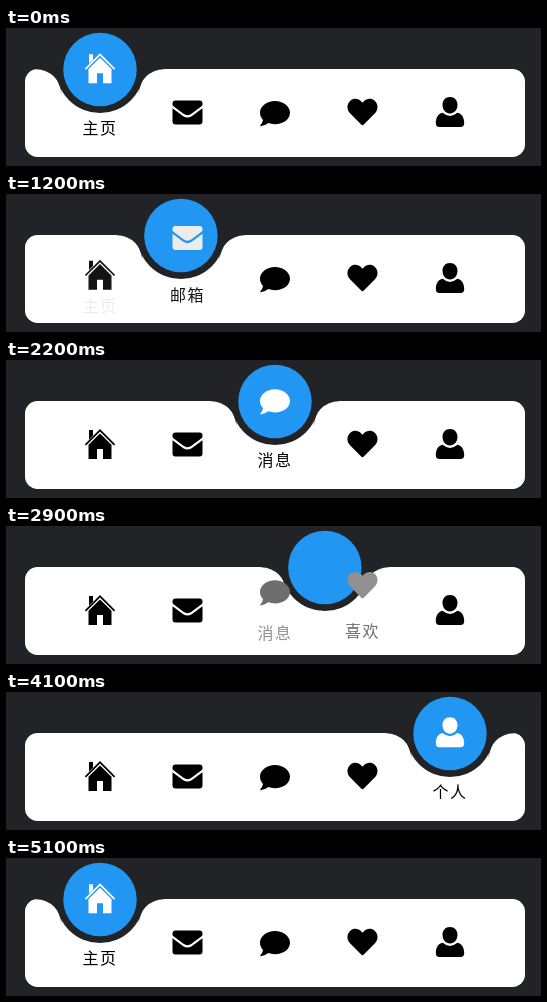
An HTML page with a canvas for the animation above (5.7 s loop, 535x138 px).

```html
<!DOCTYPE html>
<html lang="zh">
<head>
<meta charset="utf-8">
<title>导航栏</title>
<style>
html, body { margin: 0; width: 535px; height: 138px; overflow: hidden; background: #222327; }
body { position: relative; }
canvas { position: absolute; left: 0; top: 0; }
span {
  position: absolute; top: 88px; width: 87.5px;
  font: 16px/22px "Noto Sans CJK SC", "Noto Sans CJK", "Noto Sans CJK JP", sans-serif;
  letter-spacing: 1.6px; text-align: center; color: #000; white-space: nowrap;
}
</style>
</head>
<body>
<canvas id="stage" width="535" height="138"></canvas>
<script>
const LOOP = 5700, STEP = 100, DURATION = 500;
const DARK = '#222327', BLUE = '#2196f3';
const FIRST = 94, PITCH = 87.5, TOP = 41.25, RISE = 43.75, DROP = 12.5;

// start time, item left, item entered
const moves = [[867, 0, 1], [1735, 1, 2], [2735, 2, 3], [3635, 3, 4], [4635, 4, 0]];

// icon outlines around their own centre
const items = [
  ['主页', 'M-15.2 .2 L0 -15 L15.2 .2 L14 1.4 L0 -12.4 L-14 1.4Z' +
    'M-11 -14 H-7 V-8.6 L-11 -4.6Z' +
    'M0 -10.6 L11.5 .8 V15 H3 V5 H-3 V15 H-11.5 V.8Z'],
  ['邮箱', 'M-12 -11.5 H12 Q15 -11.5 15 -8.5 V-7.6 Q15 -6.6 14 -5.8 L4 1.8 Q0 4.6 -4 1.8 L-14 -5.8 Q-15 -6.6 -15 -7.6 V-8.5 Q-15 -11.5 -12 -11.5Z' +
    'M-15 -3.8 L-4.2 4.2 Q0 7 4.2 4.2 L15 -3.8 V9.5 Q15 12.5 12 12.5 H-12 Q-15 12.5 -15 9.5Z'],
  ['消息', 'M0 -11 C8.3 -11 15 -5.8 15 .7 C15 7.2 8.3 12.2 0 12.2 Q-3.6 12.2 -6.8 11.1 Q-10 14 -14.4 14.2 Q-15 13.8 -14.6 13.2 Q-12.4 10.8 -12 8 C-14 5.8 -15 3.4 -15 .7 C-15 -5.8 -8.3 -11 0 -11Z'],
  ['喜欢', 'M0 -9.3 L1.2 -10.5 C4.1 -13.6 8.9 -14.1 12.1 -11.3 C15.8 -8.2 16 -2.6 12.7 .9 L1.3 12.6 Q0 13.8 -1.3 12.6 L-12.7 .9 C-16 -2.6 -15.8 -8.2 -12.1 -11.3 C-8.9 -14.1 -4.1 -13.6 -1.2 -10.5Z'],
  ['个人', 'M0 -15 C4.6 -15 7.5 -11.6 7.5 -7.2 C7.5 -2.4 4.2 1.6 0 1.6 C-4.2 1.6 -7.5 -2.4 -7.5 -7.2 C-7.5 -11.6 -4.6 -15 0 -15Z' +
    'M-7.4 .8 Q0 7 7.4 .8 C12 1.8 14.2 6 14.2 11 Q14.2 15 10.6 15 H-10.6 Q-14.2 15 -14.2 11 C-14.2 6 -12 1.8 -7.4 .8Z']
].map(([name, d], i) => {
  const label = document.createElement('span');
  label.textContent = name;
  label.style.left = FIRST + (i - 0.5) * PITCH + 'px';
  document.body.append(label);
  return { label, x: FIRST + i * PITCH, icon: new Path2D(d) };
});

const ctx = document.getElementById('stage').getContext('2d');

const bezier = (a, b, u) => 3 * a * u * (1 - u) ** 2 + 3 * b * u * u * (1 - u) + u ** 3;

function ease(t) {
  if (t <= 0) return 0;
  if (t >= 0.92) return 1;
  let lo = 0, hi = 1;
  for (let i = 0; i < 24; i++) {
    const mid = (lo + hi) / 2;
    if (bezier(0.25, 0.25, mid) < t) lo = mid; else hi = mid;
  }
  return bezier(0.1, 1, lo);
}

function disc(x, y, r, color) {
  ctx.fillStyle = color;
  ctx.beginPath();
  ctx.arc(x, y, r, 0, Math.PI * 2);
  ctx.fill();
}

// curved lip where the bar meets the notch
function lip(x, side) {
  ctx.save();
  ctx.translate(x, TOP);
  ctx.scale(side, 1);
  ctx.fillStyle = DARK;
  ctx.beginPath();
  ctx.moveTo(63.75, -1);
  ctx.lineTo(63.75, 0);
  ctx.arc(63.75, 25, 25, -Math.PI / 2, -Math.PI, true);
  ctx.lineTo(38.75, 12.5);
  ctx.lineTo(38.75, -1);
  ctx.fill();
  ctx.restore();
}

function draw(time) {
  const t = Math.floor((time % LOOP) / STEP) * STEP;
  const move = moves.filter(m => m[0] <= t).pop() || [-DURATION, 0, 0];
  const [start, from, to] = move;
  const e = ease((t - start) / DURATION);
  const x = FIRST + PITCH * (from + (to - from) * e);

  ctx.fillStyle = DARK;
  ctx.fillRect(0, 0, 535, 138);
  ctx.fillStyle = '#fff';
  ctx.beginPath();
  ctx.roundRect(19, 41, 500, 88, 12.5);
  ctx.fill();

  lip(x, -1);
  lip(x, 1);
  disc(x, TOP, 43.75, DARK);
  disc(x, TOP + 0.2, 36.75, BLUE);

  items.forEach((item, i) => {
    const on = i === to ? e : i === from ? 1 - e : 0;
    const tone = Math.round(255 * on);
    ctx.save();
    ctx.translate(item.x, 84 - RISE * on);
    ctx.fillStyle = `rgb(${tone},${tone},${tone})`;
    ctx.fill(item.icon);
    ctx.restore();
    item.label.style.opacity = on;
    item.label.style.transform = `translateY(${DROP * (1 - on)}px)`;
  });
}

const begin = performance.now();
function tick() {
  draw(performance.now() - begin);
  requestAnimationFrame(tick);
}
tick();
</script>
</body>
</html>
```
